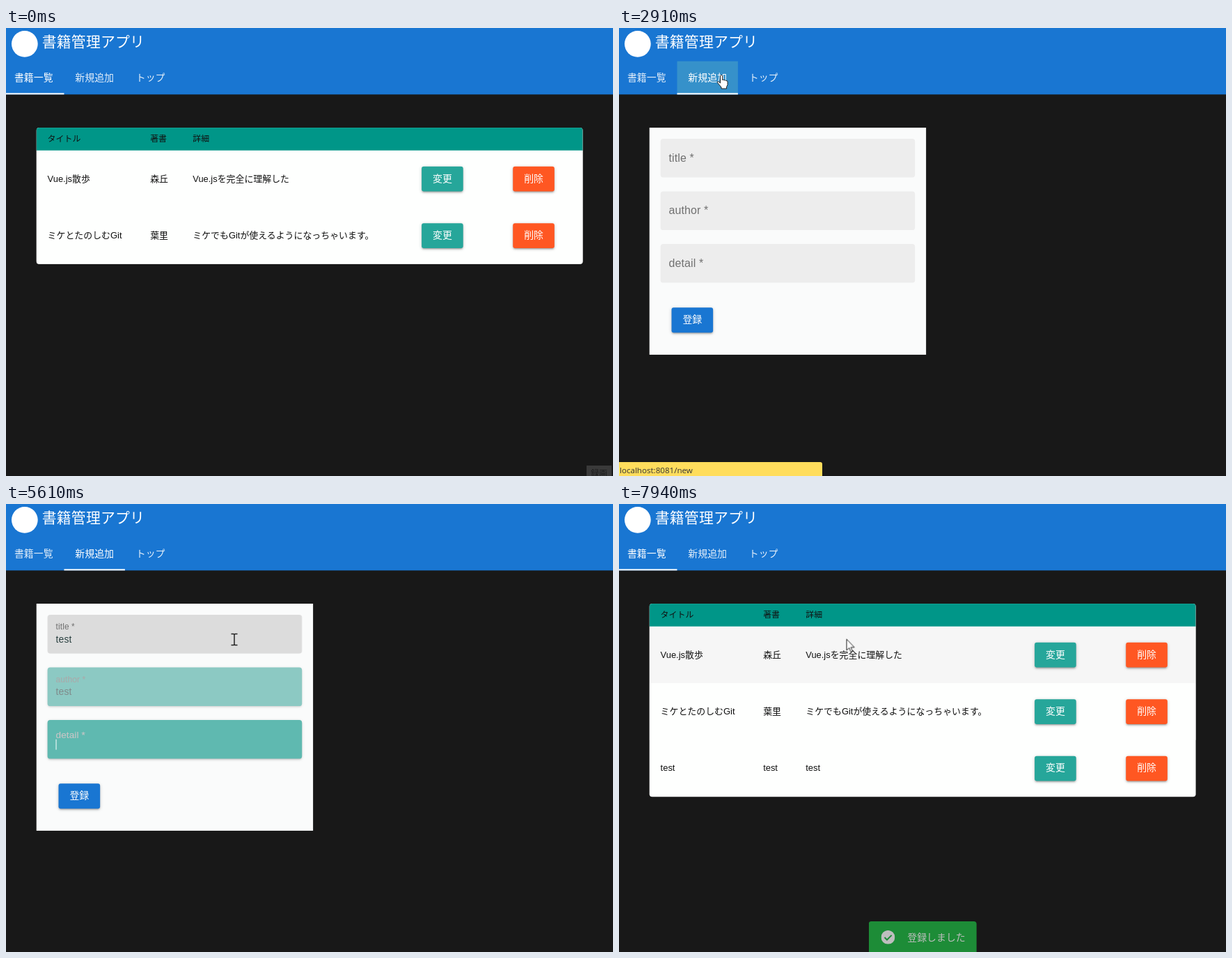
Animation of 872 by 643 pixels, one loop 8 s. Source, as an HTML page:

```html
<!DOCTYPE html>
<html lang="ja">
<head>
<meta charset="utf-8">
<title>書籍管理アプリ</title>
<style>
@property --on { syntax: '<number>'; inherits: true; initial-value: 0; }
@property --up { syntax: '<number>'; inherits: true; initial-value: 0; }

html, body { margin: 0; width: 100%; height: 100%; overflow: hidden; }
body {
  position: relative; background: #181818; color: #111;
  font: 13px/20px 'Liberation Sans', 'Noto Sans CJK JP', 'Noto Sans CJK', sans-serif;
}
body * { position: absolute; white-space: nowrap; box-sizing: border-box; }
.anim { animation: 8s infinite linear; }
.step { animation: 8s infinite step-end; }
/* the web page is shown slightly below its natural size */
.app { left: 0; top: 0; width: 878px; height: 648px; transform: scale(.9935); transform-origin: 0 0; }
.page { inset: 0; }

/* header */
header { width: 100%; height: 96px; background: #1976d2; color: #fff; }
.logo { left: 8px; top: 4px; width: 38px; height: 38px; border-radius: 50%; background: #fff; }
h1 {
  margin: 0; left: 52px; top: 8px; font: inherit; font-size: 21px; line-height: 24px; letter-spacing: .01em;
}
.tab { top: 61.5px; font-size: 14px; }
.tab.first { left: 12px; animation-name: first; }
.tab.second { left: 100px; animation-name: second; }
.tab.third { left: 188px; opacity: .88; }
.hover { left: 84px; top: 48px; width: 88px; height: 48px; background: #3691ca; animation-name: tabHover; }
.bar { top: 94px; height: 2px; background: #fff; animation-name: bar; animation-timing-function: ease; }
@keyframes first { 0%, 94.125% { opacity: 1; } 30.625% { opacity: .88; } }
@keyframes second { 0%, 94.125% { opacity: .88; } 30.625% { opacity: 1; } }
@keyframes tabHover {
  0%, 23.5% { opacity: 0; } 26.25%, 36.75% { opacity: 1; } 39%, 100% { opacity: 0; }
}
@keyframes bar {
  0%, 30.625% { left: 0; width: 84px; }
  33.75%, 94.125% { left: 84px; width: 88px; }
  97.25%, 100% { left: 0; width: 84px; }
}

/* buttons */
.btn {
  width: 60px; height: 36px; border-radius: 3px; color: #fff; background: #26a69a;
  font-size: 14px; line-height: 35px; text-align: center;
  box-shadow: 0 1px 5px #0003, 0 2px 2px #00000024, 0 3px 1px -2px #0000001f;
}
.glow { inset: 0; border-radius: 3px; background: #fff; opacity: 0; }

/* list */
.list { animation-name: list; }
.card {
  left: 44px; top: 144px; width: 790px; height: 197px;
  border-radius: 4px; overflow: hidden; background: #fefffe; animation-name: grow;
}
.head { width: 100%; height: 33px; background: #009688; font-size: 12px; }
.head span { top: 6px; }
.row { width: 100%; height: 82px; }
.row span { top: 30.5px; }
.card span:nth-of-type(1) { left: 16px; }
.card span:nth-of-type(2) { left: 164.5px; }
.card span:nth-of-type(3) { left: 226px; }
.row .btn { left: 557px; top: 23px; }
.row .del { left: 689px; background: #ff5722; }
.row:nth-child(2) { top: 33px; animation-name: row1; }
.row:nth-child(3) { top: 115px; animation-name: row2; }
.row:nth-child(4) { top: 197px; }
.row .glow { animation-name: delHover; }
@keyframes list { 0%, 94.125% { opacity: 1; } 30.625% { opacity: 0; } }
@keyframes grow { 0% { height: 197px; } 94.125% { height: 279px; } }
@keyframes row1 {
  0%, 17.5% { background: #fefffe; } 12.5%, 95% { background: #f6f6f6; }
}
@keyframes row2 { 0%, 12.5% { background: #fefffe; } 8.25% { background: #f6f6f6; } }
@keyframes delHover { 0%, 16.5% { opacity: 0; } 12.5% { opacity: .15; } }

/* form */
.form { animation-name: form; }
.sheet { left: 44px; top: 144px; width: 400px; height: 328px; background: #fafbfb; }
.field {
  left: 16px; width: 368px; height: 56px; border-radius: 4px; background: #ededed;
  animation-timing-function: cubic-bezier(.4, 0, .2, 1);
}
.fill, .shade { inset: 0; border-radius: 4px; }
.fill {
  background: #009688; opacity: var(--on);
  box-shadow: 0 1px 5px #0003, 0 2px 2px #00000024, 0 3px 1px -2px #0000001f;
}
.shade { background: #00000012; animation-name: shade; }
.label, .input { left: 12px; -webkit-text-stroke: calc(var(--on) * .3px); }
.label {
  top: 17.5px; font-size: 16px; letter-spacing: .009em; transform-origin: 0 50%;
  transform: translateY(calc(var(--up) * -10.5px)) scale(calc(1 - .25 * var(--up)));
  color: color-mix(in srgb, #fff calc(var(--on) * 100%), #707070);
}
.input {
  box-sizing: content-box; top: 28px; height: 15px; overflow: hidden;
  border-right: 1px solid transparent;
  font-size: 14px; line-height: 15px; letter-spacing: .009em;
  color: color-mix(in srgb, #fff calc(var(--on) * 100%), #2a4040);
}
.title { top: 16px; animation-name: focus1; }
.author { top: 92px; animation-name: focus2; }
.detail { top: 168px; animation-name: focus3; }
.title .input { animation-name: type1; }
.author .input { animation-name: type2; }
.detail .input { animation-name: type3; }
.send { left: 32px; top: 260px; background: #1976d2; }
.send .glow { animation-name: sendFocus; }
@keyframes form { 0%, 94.125% { opacity: 0; } 30.625% { opacity: 1; } }
@keyframes shade { 0%, 38.5% { opacity: 0; } 41%, 100% { opacity: 1; } }
@keyframes focus1 {
  0%, 40% { --on: 0; --up: 0; } 44.5%, 58.25% { --on: 1; --up: 1; } 62.75%, 100% { --on: 0; --up: 1; }
}
@keyframes focus2 {
  0%, 58.25% { --on: 0; --up: 0; } 62.75%, 68.375% { --on: 1; --up: 1; } 72.875%, 100% { --on: 0; --up: 1; }
}
@keyframes focus3 {
  0%, 68.375% { --on: 0; --up: 0; } 72.875%, 86.25% { --on: 1; --up: 1; } 90.75%, 100% { --on: 0; --up: 1; }
}
@keyframes type1 {
  0% { width: 0; border-color: transparent; }
  40% { border-color: #fff; }
  46.625% { width: 0; border-color: transparent; }
  50.75% { width: 4.1px; border-color: #fff; }
  51.625% { width: 12px; }
  54.125% { width: 19.2px; }
  56% { width: 23.3px; }
  58.25%, 100% { width: 23.3px; border-color: transparent; }
}
@keyframes type2 {
  0% { width: 0; border-color: transparent; }
  58.25% { width: 0; border-color: #fff; }
  60.75% { width: 4.1px; }
  61.625% { width: 12px; }
  63.25% { width: 19.2px; }
  65% { width: 23.3px; }
  68.375%, 100% { width: 23.3px; border-color: transparent; }
}
@keyframes type3 {
  0% { width: 0; border-color: transparent; }
  68.375% { width: 0; border-color: #fff; }
  71.875% { width: 4.1px; }
  72.75% { width: 12px; }
  76.125% { border-color: transparent; }
  81.875% { width: 19.2px; border-color: #fff; }
  84.625% { width: 23.3px; }
  86.25%, 100% { width: 23.3px; border-color: transparent; }
}
@keyframes sendFocus { 0%, 86.25% { opacity: 0; } 90%, 100% { opacity: .2; } }

/* overlays */
.note {
  left: 361px; top: 589px; width: 156px; height: 48px; border-radius: 4px;
  background: #21ba45; color: #fff; font-size: 14px; line-height: 46px; padding-left: 56px;
  opacity: var(--on); transform: translateY(calc(50px - var(--on) * 50px)); animation-name: note;
}
.note svg { left: 18px; top: 13px; }
.rec {
  left: 834px; top: 628px; width: 36px; height: 20px; background: #3a3a3a; color: #1c1c1c;
  font-size: 12px; line-height: 24px; text-align: center; animation-name: rec;
}
.url {
  left: 0; top: 623px; width: 292px; height: 20px; padding-left: 1px;
  border-radius: 0 3px 0 0; background: #ffdd5c; color: #333;
  font: 11.6px/24px 'Open Sans', 'Noto Sans', sans-serif; animation-name: url;
}
@keyframes note {
  0%, 94.125% { --on: 0; } 96% { --on: .2; } 97.5% { --on: .47; } 99.25% { --on: .72; } 100% { --on: .79; }
}
@keyframes rec { 0% { opacity: 1; } .875%, 100% { opacity: 0; } }
@keyframes url { 0%, 24% { opacity: 0; } 25.25%, 40.5% { opacity: 1; } 43%, 100% { opacity: 0; } }

/* cursors */
.mouse { left: 0; top: 0; animation-name: mouse; }
.mouse svg { overflow: visible; fill: #fff; stroke: #222; stroke-linejoin: round; }
.arrow { animation-name: arrow; }
.hand { animation-name: hand; }
.beam {
  left: 0; top: 0; fill: none; stroke: #fff; stroke-width: 1.5;
  mix-blend-mode: difference; animation-name: beam;
}
@keyframes mouse {
  0%, 4.1% { transform: translate(806px, 700px); }
  4.125% { transform: translate(806px, 543px); }
  5%, 8% { transform: translate(799px, 394px); }
  8.25% { transform: translate(785px, 330px); }
  9.125%, 11.5% { transform: translate(770px, 262px); }
  13.375%, 15.8% { transform: translate(755px, 222px); }
  18% { transform: translate(520px, 190px); }
  21% { transform: translate(240px, 110px); }
  22.5% { transform: translate(155px, 53px); }
  25.25%, 36.4% { transform: translate(147px, 67px); }
  40%, 94.4% { transform: translate(328px, 194px); }
  94.5%, 100% { transform: translate(326.5px, 193.5px); }
}
@keyframes arrow {
  0%, 16.5%, 37.2%, 94.5% { opacity: 1; } 12.5%, 22%, 38.5% { opacity: 0; }
}
@keyframes hand { 0%, 16.5%, 37.2% { opacity: 0; } 12.5%, 22% { opacity: 1; } }
@keyframes beam {
  0% { opacity: 0; transform: translate(248px, 150px); }
  38.5% { opacity: 1; transform: translate(270px, 165px); }
  39.25% { transform: translate(304px, 184px); }
  40% { opacity: 1; transform: translate(322px, 185px); }
  94.5%, 100% { opacity: 0; transform: translate(322px, 185px); }
}
</style>
</head>
<body>
<div class="app">
  <header>
    <div class="logo"></div>
    <h1>書籍管理アプリ</h1>
    <div class="hover anim"></div>
    <div class="tab first step">書籍一覧</div>
    <div class="tab second step">新規追加</div>
    <div class="tab third">トップ</div>
    <div class="bar anim"></div>
  </header>

  <div class="page list step">
    <div class="card step">
      <div class="head"><span>タイトル</span><span>著書</span><span>詳細</span></div>
      <div class="row step">
        <span>Vue.js散歩</span><span>森丘</span><span>Vue.jsを完全に理解した</span>
        <div class="btn">変更</div>
        <div class="btn del"><i class="glow step"></i>削除</div>
      </div>
      <div class="row step">
        <span>ミケとたのしむGit</span><span>葉里</span><span>ミケでもGitが使えるようになっちゃいます。</span>
        <div class="btn">変更</div>
        <div class="btn del">削除</div>
      </div>
      <div class="row">
        <span>test</span><span>test</span><span>test</span>
        <div class="btn">変更</div>
        <div class="btn del">削除</div>
      </div>
    </div>
  </div>

  <div class="page form step">
    <div class="sheet">
      <div class="field title anim">
        <div class="fill"></div><div class="shade anim"></div>
        <div class="label">title *</div><div class="input step">test</div>
      </div>
      <div class="field author anim">
        <div class="fill"></div>
        <div class="label">author *</div><div class="input step">test</div>
      </div>
      <div class="field detail anim">
        <div class="fill"></div>
        <div class="label">detail *</div><div class="input step">test</div>
      </div>
      <div class="btn send"><i class="glow anim"></i>登録</div>
    </div>
  </div>

  <div class="note anim">
    <svg width="20" height="20"><circle cx="10" cy="10" r="10" fill="#fff"/><path d="M5 10.2l3.5 3.5L15.2 7" fill="none" stroke="#21ba45" stroke-width="2"/></svg>
    登録しました
  </div>
</div>

<div class="rec step">録画</div>
<div class="url anim">localhost:8081/new</div>

<div class="mouse anim">
  <svg class="arrow step" width="12" height="20"><path d="M.5.5v16l3.7-3.5 2.5 6 2.4-1-2.5-5.8h5z"/></svg>
  <svg class="hand step" width="18" height="21"><path d="M-1.5 1.5q1.5-2.5 3 0v6q1.5-1 2.7.5 1.5-.8 2.6.7 2-.6 2.2 1.3v4.5l-1.500 3v2.500h-7.500v-2l-5.500-6.500q-.8-2 1.200-1.800l2.800 2.300z"/></svg>
</div>
<svg class="beam step" width="12" height="19"><path d="M1.5 1.5h3.5l1 1 1-1h3.5M6 2v15M1.5 17.5h3.5l1-1 1 1h3.5"/></svg>
</body>
</html>
```
